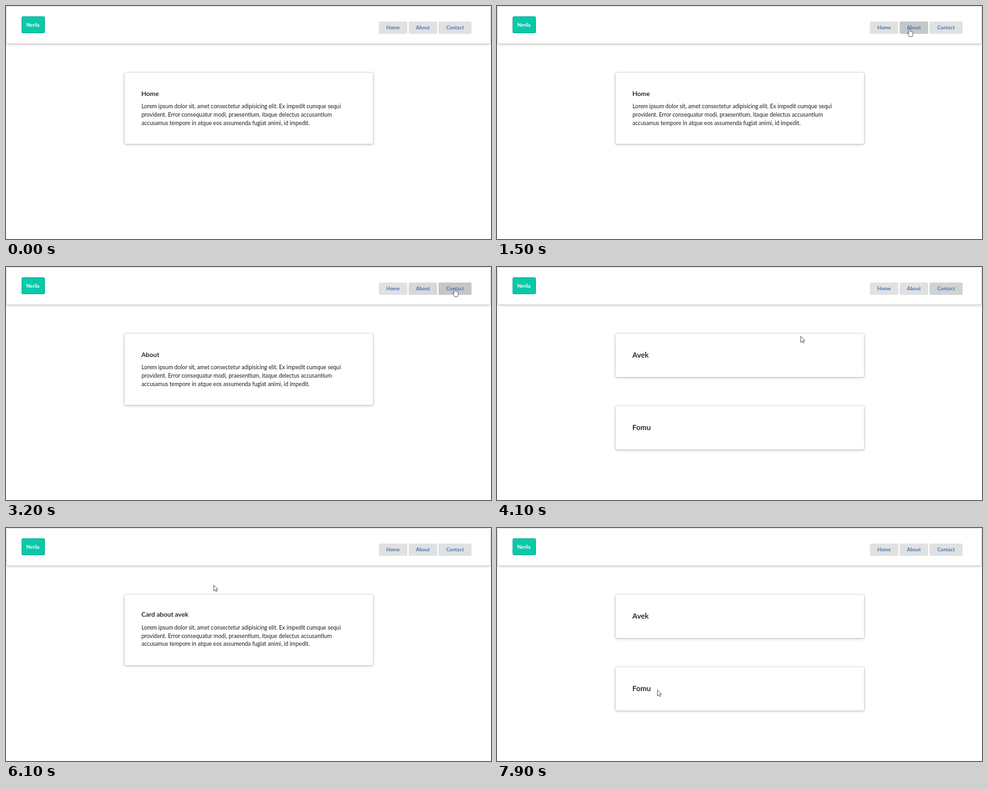
These frames come from a looping animation (748 px wide and 360 px high, 8 s). An HTML page:

```html
<!DOCTYPE html>
<html lang="en">
<head>
<meta charset="utf-8">
<title>Card navigation</title>
<style>
html, body { margin: 0; width: 100%; height: 100%; overflow: hidden; background: #fff; }
#stage { position: relative; width: 748px; height: 360px; overflow: hidden; background: #fff; }
#stage > * { position: absolute; box-sizing: border-box; }
.panel {
  background: #fff; border-radius: 2px;
  box-shadow: 0 1px 4px rgba(0,0,0,.25), 0 0 0 .6px rgba(34,36,38,.13);
}
#bar { left: 1px; top: 1px; width: 746px; height: 56.5px; }
.card { left: 183px; width: 382.5px; }
#logo { left: 23.5px; top: 16px; width: 36.5px; height: 25.5px; border-radius: 2px;
  background: #08c9a9; border: 1px solid #06ae92; }
.button { top: 24px; height: 19px; border-radius: 2px; }
svg { left: 0; top: 0; }
text { font-family: Lato, sans-serif; fill: #1c1c1d; white-space: pre; }
.small { font-size: 7.7px; font-weight: 700; text-anchor: middle; fill: #4576b3; }
.title { font-size: 10.1px; font-weight: 600; fill: #111; }
.name { font-size: 11.4px; font-weight: 600; fill: #111; }
.body { font-size: 8.68px; }
#cursor { fill: #fff; stroke: #333; stroke-width: .7; stroke-linejoin: round; stroke-linecap: round; }
</style>
</head>
<body>
<div id="stage">
  <div id="bar" class="panel"></div>
  <div id="logo"></div>
  <div class="card panel" id="cardA"></div>
  <div class="card panel" id="cardB"></div>
  <svg width="748" height="360">
    <text class="small" x="41.5" y="31.8" style="fill:#fff">Nerila</text>
    <g id="labels"></g>
    <g id="article">
      <text class="title" id="heading" x="208.7" y="138.5"></text>
      <g id="paragraph"></g>
    </g>
    <g id="people">
      <text class="name" x="208.8" y="140">Avek</text>
      <text class="name" x="208.8" y="252.4">Fomu</text>
    </g>
    <g id="cursor">
      <path id="arrow" d="M.4 .4V9.4L2.5 7.5 3.9 10.5 5.3 9.8 4 7H6.7Z"/>
      <g id="hand">
        <path d="M-1.1 7.4V1.2Q-1.1 0 0 0T1.1 1.2V4.2Q2.2 3.7 2.8 4.6 3.9 4.2 4.3 5.2 5.6 5 5.6 6.3V8.6Q5.5 10.2 4.6 11V12.3H-.5V11.2L-3.2 7.7Q-3.7 6.6-2.7 6.3-2 6.2-1.1 7.4Z"/>
      </g>
      <path id="beam" d="M-2-5H2M0-5V6M-2 6H2" fill="none"/>
    </g>
  </svg>
</div>
<script>
const LOOP = 8000, TICK = 100;
const HOVER = .7, RISE = .4, FALL = .15;
const $ = id => document.getElementById(id);
const show = (el, on) => { el.style.display = on ? '' : 'none'; };

function addText(parent, cls, x, y, value) {
  const el = document.createElementNS('http://www.w3.org/2000/svg', 'text');
  el.setAttribute('class', cls);
  el.setAttribute('x', x);
  el.setAttribute('y', y);
  el.textContent = value;
  parent.append(el);
}

[
  'Lorem ipsum dolor sit, amet consectetur adipisicing elit. Ex impedit cumque sequi',
  'provident. Error consequatur modi, praesentium, itaque delectus accusantium',
  'accusamus tempore in atque eos assumenda fugiat animi, id impedit.'
].forEach((line, i) => addText($('paragraph'), 'body', 208.9, 158.4 + i * 12.6, line));

let nextX = 575;
const buttons = Object.entries({ Home: 44, About: 44, Contact: 51 }).map(([label, w]) => {
  const el = document.createElement('div'), x = nextX;
  nextX += w + 2;
  el.className = 'button';
  el.style.left = x + 'px';
  el.style.width = w + 'px';
  $('stage').insertBefore(el, $('cardA'));
  addText($('labels'), 'small', x + w / 2, 36.3, label);
  return { el, x, w };
});

// Each move ends at (x, y); the pointer rests there until the next one.
const appear = 100;
const moves = [
  { from: 0, to: appear, x: 694, y: 172 },
  { from: 100, to: 900, x: 42, y: 25 },
  { from: 1100, to: 1400, x: 636, y: 35 },
  { from: 2800, to: 3100, x: 692, y: 33.5 },
  { from: 3700, to: 4100, x: 468, y: 107 },
  { from: 4100, to: 4500, x: 217, y: 134 },
  { from: 5000, to: 5100, x: 487, y: 155 },
  { from: 5400, to: 5600, x: 298, y: 91 },
  { from: 6000, to: 6100, x: 320, y: 88 },
  { from: 6100, to: 6900, x: 690, y: 31 },
  { from: 7200, to: 7900, x: 247, y: 250 }
];
const clicks = [1900, 3600, 7000];

const pages = [
  { from: 0, heading: 'Home' },
  { from: 2000, heading: 'About' },
  { from: 3700, people: true },
  { from: 5000, heading: 'Card about avek', lift: 1.4 },
  { from: 7200, people: true }
];

const ease = p => p * p * (3 - 2 * p);

function pointerAt(t) {
  let { x, y } = moves[0];
  for (const m of moves) {
    const p = ease(Math.min(1, Math.max(0, (t - m.from) / (m.to - m.from))));
    x += (m.x - x) * p;
    y += (m.y - y) * p;
  }
  return { x, y };
}

const inside = ({ x, y }, left, top, w, h) => x >= left && x <= left + w && y >= top && y <= top + h;
const over = (b, point) => inside(point, b.x, 24, b.w, 19);

function pointerKind(point, page) {
  const onLink = inside(point, 24, 16, 36, 25)
    || buttons.some(b => over(b, point))
    || page.people && inside(point, 208, 130, 24, 12);
  if (onLink) return 'hand';
  return !page.people && inside(point, 209, 149, 308, 36) ? 'beam' : 'arrow';
}

// Darkens fast towards hover or press, fades back slowly; replayed from zero.
function shade(b, until) {
  let level = 0;
  for (let t = appear; t <= until; t += TICK) {
    const pressed = clicks.some(c => t >= c && t < c + 200);
    const goal = over(b, pointerAt(t)) ? (pressed ? 1 : HOVER) : 0;
    level = goal > level ? Math.min(goal, level + RISE) : Math.max(goal, level - FALL);
  }
  return level;
}

function place(card, top, height) {
  card.style.top = top + 'px';
  card.style.height = height + 'px';
}

function render(t) {
  const page = pages.filter(p => p.from <= t).pop();
  const people = !!page.people, lift = page.lift || 0;
  place($('cardA'), 102.5, people ? 67.5 : 110.5 - lift);
  place($('cardB'), 214.5, 67.5);
  show($('cardB'), people);
  show($('people'), people);
  show($('article'), !people);
  $('heading').textContent = page.heading || '';
  $('article').setAttribute('transform', `translate(0 ${-lift})`);

  for (const b of buttons) {
    const c = 224 - 38 * shade(b, t);
    b.el.style.background = `rgb(${c}, ${c + 1}, ${c + 2})`;
  }

  const point = pointerAt(t), kind = pointerKind(point, page);
  show($('cursor'), t >= appear);
  $('cursor').setAttribute('transform', `translate(${point.x} ${point.y})`);
  for (const id of ['arrow', 'hand', 'beam']) show($(id), id === kind);
}

const start = performance.now();
function loop() {
  const t = (performance.now() - start) % LOOP;
  render(Math.floor(t / TICK) * TICK);
  requestAnimationFrame(loop);
}
loop();
</script>
</body>
</html>
```
